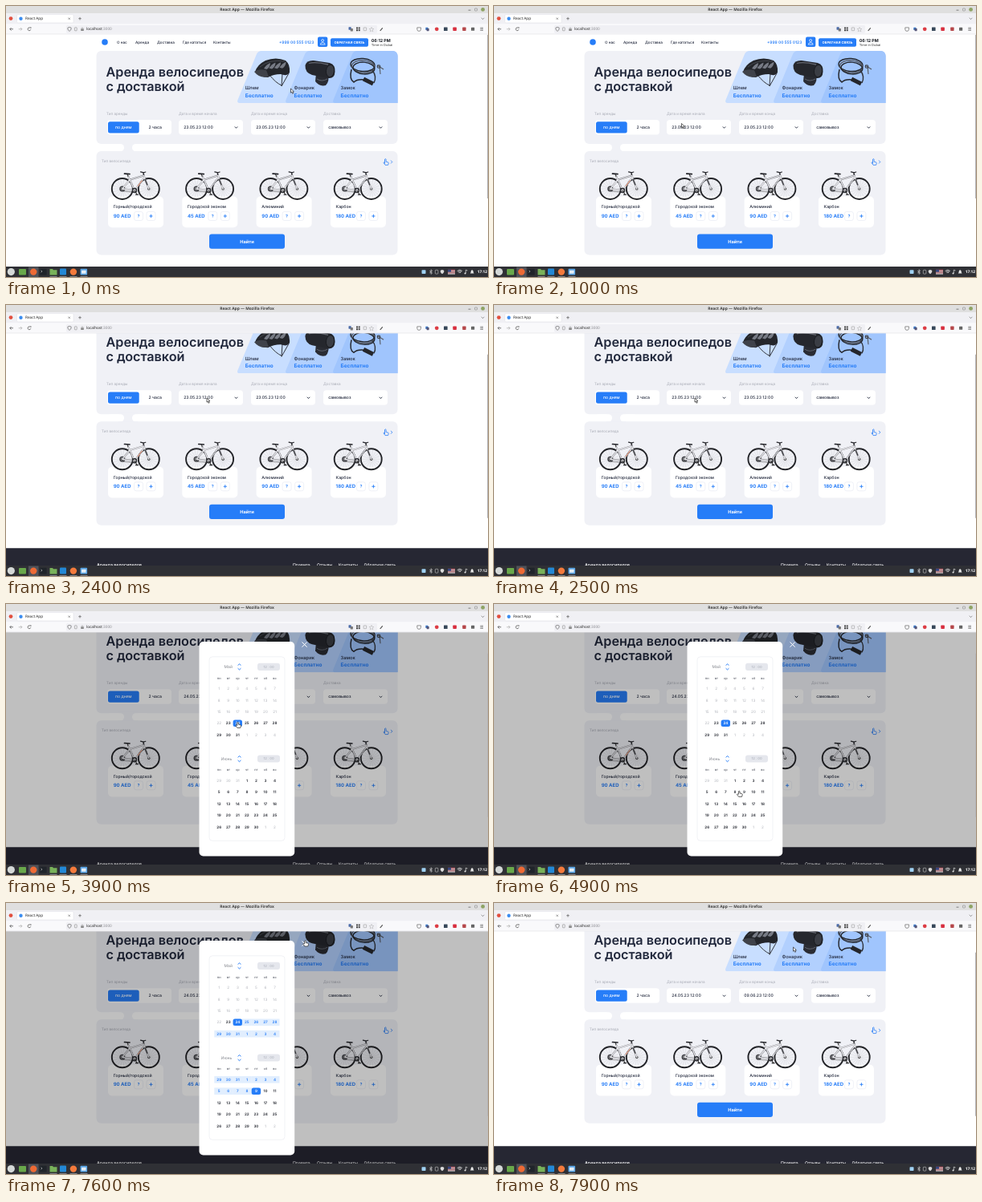
Write an HTML page with a canvas that moves like this. It is 600 by 338 pixels and loops after 8000 ms.

```html
<!DOCTYPE html>
<html lang="ru">
<head>
<meta charset="utf-8">
<title>React App</title>
<style>
html, body { margin: 0; width: 100%; height: 100%; overflow: hidden; background: #fff; }
canvas { display: block; width: 600px; height: 338px; }
</style>
</head>
<body>
<canvas id="stage"></canvas>
<script>
const W = 600, H = 338, LOOP = 8000;
const canvas = document.getElementById('stage');
const scale = Math.max(1, window.devicePixelRatio || 1);
canvas.width = W * scale;
canvas.height = H * scale;
const c = canvas.getContext('2d');

const BLUE = '#267df8', INK = '#20273b', PANEL = '#f0f1f6', MUTED = '#a8abb5';
const SITE = 'Inter, "Open Sans", sans-serif', SYSTEM = '"Noto Sans", sans-serif';

// Event times in ms
const OPEN = 2600, PICK_START = 3500, PICK_END = 5500, CLOSE = 7800;
const SCROLL = [[1000, 0], [1250, 10], [1500, 22], [1900, 35.7]];
const POINTER = [
  [0, 354.5, 103], [300, 340, 112], [900, 240, 146], [1400, 207, 148.5], [1700, 207, 148.5],
  [2300, 250, 116], [2700, 250, 116], [3400, 288.5, 147.5], [3900, 288.5, 147.5],
  [4700, 301, 233], [5200, 311.5, 234], [5800, 311.5, 234], [6600, 418, 132],
  [6950, 456, 92], [7500, 372.5, 47], [7700, 372.5, 47], [7900, 372.5, 55]
];

function along(keys, t) {
  if (t <= keys[0][0]) return keys[0].slice(1);
  for (let i = 1; i < keys.length; i++) {
    const a = keys[i - 1], b = keys[i];
    if (t <= b[0]) {
      const u = (t - a[0]) / (b[0] - a[0]);
      return a.slice(1).map((v, n) => v + (b[n + 1] - v) * u);
    }
  }
  return keys[keys.length - 1].slice(1);
}

function box(x, y, w, h, r, fill, stroke) {
  c.beginPath();
  c.roundRect(x, y, w, h, r);
  if (fill) { c.fillStyle = fill; c.fill(); }
  if (stroke) { c.strokeStyle = stroke; c.lineWidth = 0.5; c.stroke(); }
}

function oval(x, y, rx, ry, turn, fill, stroke, width = 1) {
  c.beginPath();
  c.ellipse(x, y, rx, ry, turn, 0, 7);
  if (fill) { c.fillStyle = fill; c.fill(); }
  if (stroke) { c.strokeStyle = stroke; c.lineWidth = width; c.stroke(); }
}

const dot = (x, y, r, fill) => oval(x, y, r, r, 0, fill);
const ring = (x, y, r, color, width) => oval(x, y, r, r, 0, null, color, width);

function arc(x, y, r, from, to, color, width) {
  c.beginPath();
  c.arc(x, y, r, from, to);
  c.strokeStyle = color;
  c.lineWidth = width;
  c.stroke();
}

// Points as a flat list: x, y, x, y, ...
function trace(p) {
  c.beginPath();
  for (let i = 0; i < p.length; i += 2) c.lineTo(p[i], p[i + 1]);
}

function line(p, color, width = 0.8) {
  trace(p);
  c.strokeStyle = color;
  c.lineWidth = width;
  c.stroke();
}

function poly(p, fill) {
  trace(p);
  c.closePath();
  c.fillStyle = fill;
  c.fill();
}

function path(d, fill, stroke, width = 0.8) {
  const p = new Path2D(d);
  if (fill) { c.fillStyle = fill; c.fill(p); }
  if (stroke) { c.strokeStyle = stroke; c.lineWidth = width; c.stroke(p); }
}

function text(s, x, y, size, weight = 500, color = INK, align = 'left', family = SITE) {
  c.font = `${weight} ${size}px ${family}`;
  c.textAlign = align;
  c.fillStyle = color;
  c.fillText(s, x, y);
}

function chevron(x, y, color, w = 2, h = 1.1, width = 1) {
  line([x - w, y - h, x, y + h, x + w, y - h], color, width);
}

function drawBrowser() {
  box(0, 0, W, 9, 0, '#dfdfdf');
  text('React App — Mozilla Firefox', 300, 4.4, 4.9, 700, '#3c3c3c', 'center', SYSTEM);
  line([575.5, 5.2, 578.5, 5.2], '#666');
  box(583.5, 3, 3, 3, 0.6, null, '#777');
  dot(593.6, 4.4, 2.4, '#8ea364');

  box(0, 9, W, 13.5, 0, '#f0f0f4');
  dot(6, 15.6, 2.4, '#e2503f');
  box(13.5, 10.5, 70.5, 10.5, 1.5, '#fff', '#dedee4');
  dot(18.5, 15.7, 2.2, '#3b8df0');
  text('React App', 24, 15.8, 4.7, 400, '#222', 'left', SYSTEM);
  line([77.6, 14.6, 79.8, 16.8], '#555', 0.6);
  line([79.8, 14.6, 77.6, 16.8], '#555', 0.6);
  line([90.2, 15.7, 93.8, 15.7], '#444', 0.6);
  line([92, 13.9, 92, 17.5], '#444', 0.6);
  chevron(593.5, 15.7, '#555', 1.8, 0.9, 0.6);

  box(0, 22.3, W, 12.9, 0, '#f9f9fb');
  line([9, 28.8, 4.8, 28.8], '#444', 0.7);
  line([6.6, 27, 4.8, 28.8, 6.6, 30.6], '#444', 0.7);
  line([15.7, 28.8, 19.9, 28.8], '#aaa', 0.7);
  line([18.1, 27, 19.9, 28.8, 18.1, 30.6], '#aaa', 0.7);
  arc(29, 28.8, 1.9, 0.3, 5.6, '#444', 0.7);
  poly([29.8, 26.5, 31.4, 26.5, 31.4, 28.1], '#444');
  box(75, 24, 387, 9.7, 1.5, '#f0f0f4');
  path('M79 26.4l2.1.7v1.6q-.2 1.7-2.1 2.7q-1.9-1-2.1-2.7v-1.6z', null, '#555', 0.6);
  box(85.4, 26.8, 2.8, 4, 0.6, null, '#777');
  box(93.2, 28.5, 3.6, 2.6, 0.5, '#888');
  ring(95, 28.2, 1.2, '#888', 0.5);
  text('localhost', 100, 29, 4.7, 400, '#222', 'left', SYSTEM);
  const hostWidth = c.measureText('localhost').width;
  text(':3000', 100 + hostWidth, 29, 4.7, 400, '#8a8a90', 'left', SYSTEM);

  box(426.5, 26.3, 3.2, 3.4, 0.4, '#4a6aa8');
  box(428.7, 28, 3.2, 3.4, 0.4, '#777');
  for (const [x, y] of [[436, 26.5], [438.7, 26.5], [436, 29.2], [438.7, 29.2]]) box(x, y, 2, 2, 0, '#444');
  box(445.2, 26.9, 3.4, 3.8, 0.5, null, '#888');
  path('M455 26.5l.8 1.8 2 .2-1.5 1.3.5 2-1.8-1-1.8 1 .5-2-1.5-1.3 2-.2z', null, '#aaa', 0.5);
  line([465.7, 31, 468.7, 27.4], '#444', 1.1);
  path('M511.8 26.9h4.6v2.2a2.3 2.3 0 0 1-4.6 0z', null, '#666', 0.7);
  box(522.3, 26.7, 3.2, 3.4, 0.4, '#3d78c4');
  box(523.6, 28, 3, 3.2, 0.4, '#557');
  dot(536.2, 28.8, 2.4, '#dc3d45');
  box(545, 26.5, 4.6, 4.6, 0.5, '#38485a');
  box(556.3, 26.5, 4.6, 4.6, 0.8, '#d82f3f');
  box(568.2, 26.6, 4.4, 4.4, 0.7, '#b5474a');
  box(579, 26.8, 4.2, 4, 0.6, '#666');
  for (let i = 0; i < 3; i++) line([590.3, 27.2 + i * 1.6, 594, 27.2 + i * 1.6], '#444', 0.6);
  box(0, 34.8, W, 0.5, 0, '#d8d8dd');
}

function drawHeader() {
  dot(123, 45, 3.8, BLUE);
  const nav = [['О нас', 138], ['Аренда', 161], ['Доставка', 188], ['Где кататься', 219.8], ['Контакты', 258]];
  for (const [s, x] of nav) text(s, x, 45.2, 4.6);
  text('+999 00 555 0123', 340, 45.2, 4.9, 600, BLUE);
  box(388, 38.6, 12.3, 12.3, 2, BLUE);
  ring(394.2, 43, 1.5, '#fff', 0.7);
  path('M391.3 48.1q0-2.5 2.9-2.5t2.9 2.5z', null, '#fff', 0.7);
  box(404, 40.2, 47, 10.6, 2, BLUE);
  text('ОБРАТНАЯ СВЯЗЬ', 427.5, 45.6, 4.2, 700, '#fff', 'center');
  text('06:12 PM', 454.7, 43, 5.3, 700, '#15181f');
  text('Time in Dubai', 454.7, 49, 4.1, 400, '#333');
}

function drawHelmet() {
  path('M344 84L343 100L352 84M328 86Q336 96 343 99', null, '#33353b', 1);
  path('M310 82Q313 73 323 68Q336 63 348 68Q354 73 353 83Q350 88 342 85Q333 85 326 89Q316 89 310 82z', '#24262b');
  path('M309 82Q314 78 324 80L327 88Q316 91 309 82z', '#3f4249');
  for (let i = 0; i < 4; i++) {
    path(`M${321 + i * 6.5} ${78 - i * 0.4}q3-5 8-7q0 5-4.5 8z`, '#777b85');
  }
  path('M316 76Q328 66 347 69', null, '#55585f', 0.7);
}

function drawLamp() {
  path('M386 84L401 85Q403 94 398 99Q390 101 385 94z', '#2a2c33');
  path('M372.5 74Q374 67.5 383 68L403 71Q410 73 409.5 82Q409 91 401 90L381 86Q372 83 372.5 74z', '#25272d');
  path('M377 71.5Q385 69 401 73', null, '#63666f', 1.3);
  oval(403.5, 81, 5, 7.6, 0.12, '#3a3d44', '#15171b', 0.8);
  path('M387 91Q393 95 400 91', null, '#666a74', 0.9);
}

function drawLock() {
  for (let i = 0; i < 3; i++) {
    oval(444 + i * 0.7, 73.5 + i * 2, 15 - i * 0.8, 8 - i * 0.3, 0.08, null, i % 2 ? '#555962' : '#22252b', 1.4);
  }
  path('M430 79Q427 92 433 95Q437 91 446 92', null, '#24262c', 1.5);
  path('M445 91L457 97', null, '#24262c', 5.2);
  path('M456 80Q462 88 458 96', null, '#30333a', 1.4);
  path('M462 74L470 79M465 75L466 85', null, '#55585f', 1.1);
  ring(464, 75.5, 1.8, '#3c3f46', 1.1);
}

function drawBanner() {
  c.save();
  c.beginPath();
  c.roundRect(112.5, 56, 375, 65, [6, 6, 0, 0]);
  c.clip();
  path('M291 121Q287 121 288.5 117L312 60Q314 56 318 56H488V121z', '#c8deff');
  path('M351 121Q347 121 348.5 117L372 60Q374 56 378 56H488V121z', '#b2d0fe');
  path('M410 121Q406 121 407.5 117L431 60Q433 56 437 56H488V121z', '#a0c5fd');
  c.restore();
  drawHelmet();
  drawLamp();
  drawLock();
  [['Шлем', 297.7], ['Фонарик', 358.5], ['Замок', 416.5]].forEach(([s, x]) => {
    text(s, x, 102.7, 5.8);
    text('Бесплатно', x, 111.7, 6.5, 700, BLUE);
  });
}

function drawSelect(x, label, value) {
  text(label, x, 134.2, 4.6, 400, MUTED);
  box(x, 142, 80, 18.5, 4, '#fff');
  text(value, x + 6.2, 151.4, 5.1);
  chevron(x + 71.5, 151.4, INK, 1.7, 0.9, 0.9);
}

function drawBike(x, accent) {
  c.save();
  c.translate(x, 0);
  c.lineCap = c.lineJoin = 'round';
  for (const wx of [17.8, 50.8]) {
    for (let i = 0; i < 9; i++) {
      const a = i * Math.PI / 9, dx = 13 * Math.cos(a), dy = 13 * Math.sin(a);
      line([wx - dx, 228 - dy, wx + dx, 228 + dy], '#b4b4b9', 0.25);
    }
    ring(wx, 228, 13, '#222327', 1.9);
    dot(wx, 228, 1.6, '#333');
  }
  ring(17.8, 228, 2.8, '#3c3d42', 1.5);
  const frame = [
    [26, 217, 44.5, 211.5], [45, 214, 33, 230], [25, 212, 33, 230],
    [26.5, 217.5, 17.8, 228, 33, 230], [44.2, 209.5, 46, 216, 50.8, 228]
  ];
  for (const p of frame) line(p, '#77787e', 1.9);
  for (const p of frame) line(p, '#e6e6ea', 1.3);
  line([46.2, 216.5, 48.8, 223], '#3a3b40', 1.3);
  line([42.2, 217.8, 37.2, 224.5], accent, 0.8);
  line([24, 210, 25, 212.5], '#333', 1);
  line([20.5, 209.2, 27, 209.7], '#202126', 1.7);
  line([44.4, 210.5, 44, 208, 46.8, 207], '#26272c', 1.2);
  line([40.5, 206.8, 44.5, 207.8], '#26272c', 1.2);
  line([19, 231, 33, 232.5], '#444', 0.5);
  ring(33, 230, 2.5, '#2c2d32', 1.5);
  line([33, 230, 36, 235], '#333', 1.1);
  line([34.5, 235.3, 37.5, 235.3], '#222', 1.1);
  c.restore();
}

function drawProduct(i, name, price) {
  const x = 127 + i * 92.3;
  box(x, 237.5, 69, 38.7, 5, '#fff');
  drawBike(x, i ? '#97989e' : '#e0673a');
  text(name, x + 6.7, 250.8, 5.2);
  text(price, x + 6.7, 261.8, 6, 700, BLUE);
  for (const bx of [32.5, 48]) box(x + bx, 256.5, 11, 11, 2.5, '#fff', '#dfe3ee');
  text('?', x + 38, 262, 5.5, 600, BLUE, 'center');
  line([x + 51.4, 262, x + 55.6, 262], BLUE, 0.9);
  line([x + 53.5, 259.9, x + 53.5, 264.1], BLUE, 0.9);
}

function drawPage(t) {
  box(0, 35, W, 400, 0, '#fff');
  drawHeader();

  box(112.5, 56, 375, 116, 6, PANEL);
  drawBanner();
  text('Аренда велосипедов', 124.5, 83.2, 16.2, 600);
  text('с доставкой', 124.5, 101.2, 16.2, 600);
  text('Тип аренды', 125, 134.2, 4.6, 400, MUTED);
  box(126, 142, 80, 18.5, 4, '#fff');
  box(127, 144.2, 38.7, 14.3, 2.5, BLUE);
  text('по дням', 146.3, 151.4, 5.1, 500, '#fff', 'center');
  text('2 часа', 185.7, 151.4, 5.1, 500, INK, 'center');
  drawSelect(215, 'Дата и время начала', (t >= PICK_START ? '24' : '23') + '.05.23 12:00');
  drawSelect(305, 'Дата и время конца', (t >= PICK_END ? '09.06' : '23.05') + '.23 12:00');
  drawSelect(395, 'Доставка', 'самовывоз');

  // Neck joining the two panels
  box(140, 170, 24, 13, 0, PANEL);
  box(126, 172, 21, 9.2, 4.5, '#fff');
  box(157, 172, 21, 9.2, 4.5, '#fff');

  box(112.5, 181, 375, 129.5, 6, PANEL);
  text('Тип велосипеда', 119, 193.5, 4.6, 400, MUTED);
  path('M471.5 196.3V191.2q.9-1.2 1.6 0V194.3l2.2.5q1.2.3.9 1.6l-.6 1.9h-3.6l-2.1-2.9q.5-1 1.6.2z', null, BLUE, 0.8);
  line([479, 192.6, 480.8, 194.5, 479, 196.4], BLUE, 0.8);
  [['Горный/городской', '90 AED'], ['Городской эконом', '45 AED'], ['Алюминий', '90 AED'], ['Карбон', '180 AED']]
    .forEach(([name, price], i) => drawProduct(i, name, price));
  box(253, 284.4, 94, 18.3, 3, BLUE);
  text('Найти', 300, 293.8, 5.7, 700, '#fff', 'center');

  box(0, 339, W, 100, 0, '#262733');
  text('Аренда велосипедов', 113, 360, 5.3, 600, '#fff');
  [['Правила', 357], ['Отзывы', 387], ['Контакты', 414], ['Обратная связь', 445.5]]
    .forEach(([s, x]) => text(s, x, 360, 5.1, 500, '#fff'));
}

// first: cell index of day 1, prev: last day of the previous month
function drawMonth(top, m) {
  text(m.name, m.x, top, 5, 400, '#85888f', 'center');
  chevron(290.5, top - 2.6, BLUE, 1.9, -0.9, 1);
  chevron(290.5, top + 2.8, BLUE, 1.9, 0.9, 1);
  box(313, top - 4.6, 28, 9.2, 3, '#e5e7ed');
  text('12 : 00', 327, top + 0.2, 4.2, 400, '#a5a9b4', 'center');
  ['пн', 'вт', 'ср', 'чт', 'пт', 'сб', 'вс'].forEach((d, i) =>
    text(d, 265.2 + i * 11.55, top + 14.3, 3.9, 500, '#575b66', 'center'));

  for (let i = 0; i < 35; i++) {
    const x = 265.2 + (i % 7) * 11.55, y = top + 27.4 + Math.floor(i / 7) * 14.4;
    const n = i - m.first + 1;
    const day = n < 1 ? m.prev + n : n > m.days ? n - m.days : n;
    const outside = n < 1 || n > m.days;
    const inRange = i >= m.from && i <= m.to;
    if (inRange) box(x - 5.9, y - 4.4, 11.9, 8.6, 0, '#e1eefe');
    const solid = m.solid === i;
    if (solid) box(x - 5.7, y - 4.4, 11.4, 8.6, 2.5, BLUE);
    const gray = outside || n < m.today;
    const color = solid ? '#fff' : inRange ? BLUE : gray ? '#b0b3ba' : '#22252e';
    text(day, x, y + 0.2, 4.6, gray && !inRange ? 400 : 600, color, 'center');
  }
}

function drawModal(t) {
  box(0, 35, W, 290, 0, 'rgba(0,0,0,0.25)');
  line([368.5, 47.5, 374.7, 53.7], '#fff', 1);
  line([374.7, 47.5, 368.5, 53.7], '#fff', 1);
  box(240.5, 47, 118.7, 267.5, 5, '#fff');
  box(253, 65.8, 94, 229.5, 4, null, '#e3e5ea');
  const ranged = t >= PICK_END;
  drawMonth(78.3, {
    name: 'Май', x: 276.7, first: 0, prev: 30, days: 31, today: 23,
    solid: t >= PICK_START ? 23 : 22, from: ranged ? 23 : 99, to: 34
  });
  drawMonth(193, {
    name: 'Июнь', x: 274.5, first: 3, prev: 31, days: 30, today: 0,
    solid: ranged ? 11 : -1, from: ranged ? 0 : 99, to: 11
  });
}

function drawTaskbar() {
  box(0, 325, W, 13, 0, '#2f3035');
  dot(6.3, 331.6, 4.6, '#d5d9d8');
  box(16, 328, 9, 7.5, 1, '#69a84b');
  box(28, 325.5, 12.5, 12.5, 0, '#505259');
  dot(34.2, 331.6, 4.2, '#ee6a35');
  box(42, 327.8, 8.6, 7.6, 1, '#20242a');
  line([43.5, 329.8, 45, 331, 43.5, 332.2], '#ddd', 0.6);
  path('M54.5 328h3.5l1 1.2h4.5v6.3h-9z', '#79b25a');
  box(67, 327.6, 8, 8, 1, '#2388d6');
  dot(83.9, 331.6, 4.2, '#f47a3c');
  box(92.5, 327.7, 8.6, 7.8, 1, '#5aa5e6');
  box(94, 329.7, 5.6, 4, 0.5, '#e5eef6');
  for (const x of [59, 71, 84, 97]) box(x - 4.5, 337, 9, 0.7, 0, '#a5a7ab');

  box(517.5, 329.2, 5, 4.8, 0.8, '#9fd0f2');
  line([527.2, 330.2, 530.6, 333, 529, 334.4, 529, 328.8, 530.6, 330.2, 527.2, 333], '#e7e7e7', 0.6);
  box(534.3, 329.3, 3.6, 4.8, 0.8, null, '#e7e7e7');
  path('M543 329l2.2.7v1.8q-.3 1.8-2.2 2.8q-1.9-1-2.2-2.8v-1.8z', '#dcdcdc');
  for (let i = 0; i < 6; i++) box(550, 328.8 + i * 0.95, 9, 0.95, 0, i % 2 ? '#fff' : '#c64450');
  box(550, 328.8, 4, 2.9, 0, '#34457e');
  for (const r of [1.7, 3.2, 4.7]) arc(564.8, 334, r, -2.3, -0.85, '#e7e7e7', 0.8);
  dot(571.5, 333.5, 1, '#e7e7e7');
  line([572.3, 333.5, 572.3, 329.2, 574.5, 330], '#e7e7e7', 0.7);
  path('M577.8 333.5q1-1 1-3q1.4-2.6 2.8 0q0 2 1 3z', '#e7e7e7');
  text('17:12', 599, 331.8, 4.8, 600, '#fff', 'right', SYSTEM);
}

function drawPointer(t) {
  const [x, y] = along(POINTER, t);
  const inModal = t >= OPEN && t < CLOSE;
  const overDay = inModal && x > 259 && x < 341 && y > 100 && y < 285;
  const overClose = inModal && Math.abs(x - 371.6) < 4 && y < 54;
  c.save();
  c.translate(x, y);
  c.lineJoin = 'round';
  if (overDay || overClose) {
    path('M-.8 4V.3Q0-.7.8.3V2.6L3.4 3.2Q4.2 3.5 4 4.6L3.3 7H-.6L-2.8 4.1Q-2.3 3-.8 4z', '#fff', '#222', 0.7);
  } else {
    path('M0 0V5.2L1.2 4.2 2.2 6.3 3.2 5.8 2.3 3.8H3.9z', '#fff', '#222', 0.7);
  }
  c.restore();
}

function render(t) {
  c.setTransform(scale, 0, 0, scale, 0, 0);
  c.textBaseline = 'middle';
  c.textRendering = 'geometricPrecision';
  const [scroll] = along(SCROLL, t);
  c.save();
  c.beginPath();
  c.rect(0, 35, W, 290);
  c.clip();
  c.save();
  c.translate(0, -scroll);
  drawPage(t);
  c.restore();
  if (t >= OPEN && t < CLOSE) drawModal(t);
  box(599, 36 + scroll * 0.72, 1, 204, 0, '#b4b4b8');
  c.restore();
  drawBrowser();
  drawTaskbar();
  drawPointer(t);
}

const start = performance.now();
function tick() {
  const t = (performance.now() - start) % LOOP;
  // The screen advances in steps of 100 ms
  render(Math.floor(t / 100) * 100);
  requestAnimationFrame(tick);
}
tick();
</script>
</body>
</html>
```
